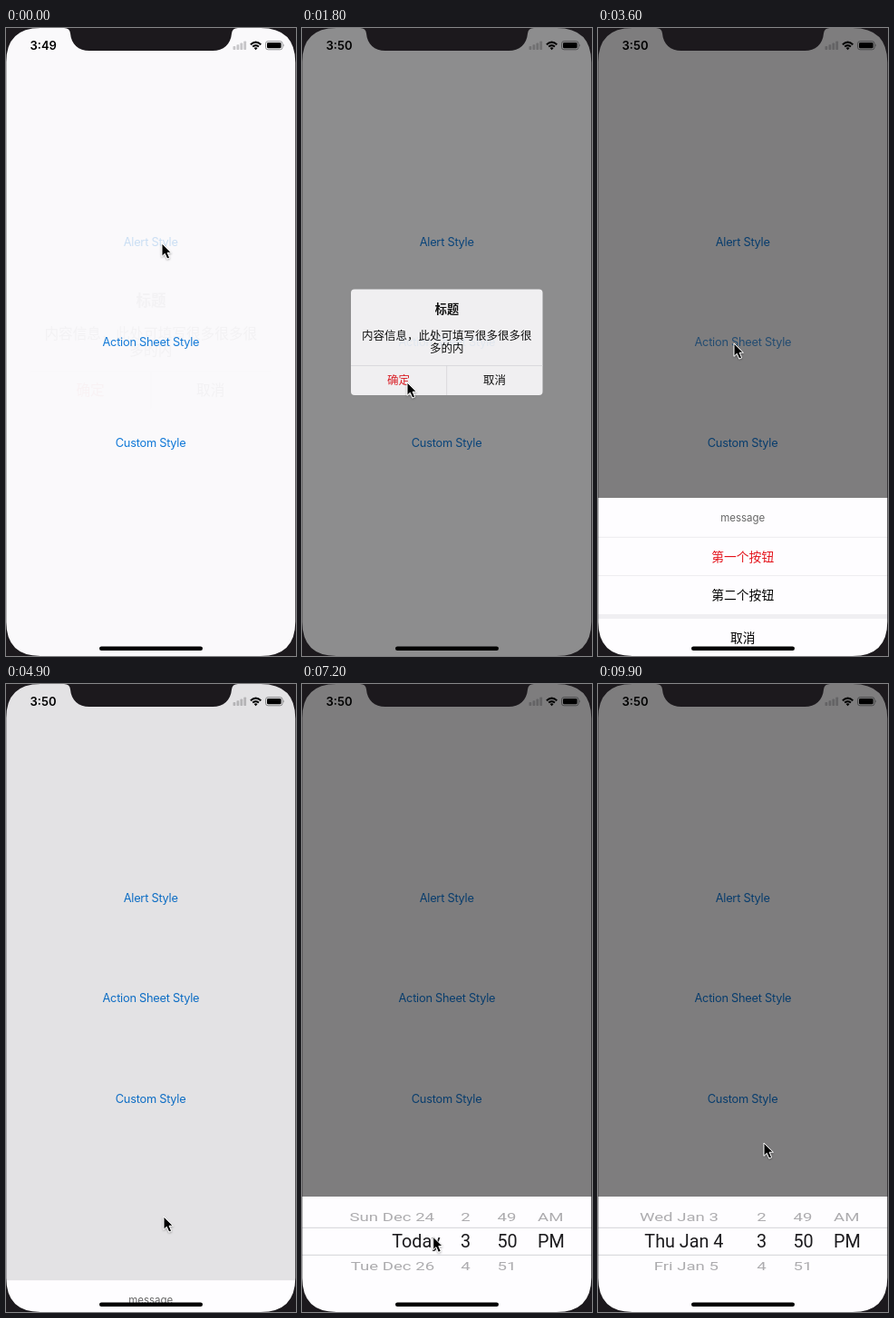
An HTML page for the animation above (10 s loop, 320 by 691 pixels).

```html
<!DOCTYPE html>
<html lang="en">
<head>
<meta charset="utf-8">
<title>Popup styles</title>
<style>
  html, body { margin: 0; width: 100%; height: 100%; overflow: hidden; background: #fdfcfe; }
  svg { display: block; width: 100vw; height: 100vh; }
  text { font-family: Inter, "Noto Sans CJK SC", "Noto Sans CJK", sans-serif; text-anchor: middle; }
  .link { font-size: 12.8px; letter-spacing: -.25px; fill: #0f79da; }
  .clock { font-size: 13px; font-weight: 600; text-anchor: start; }
  .cjk { font-family: "Noto Sans CJK SC", "Noto Sans CJK", sans-serif; }
  .body { font-size: 12.5px; }
  .title { font-size: 13.2px; font-weight: 700; }
  .row { font-size: 13.8px; }
  .note { font-size: 11.5px; fill: #666; }
  .wheel text { font-family: Roboto, sans-serif; font-size: 19.8px; }
  .red { fill: #e4141c; }
  .rule { stroke: #dddce0; stroke-width: .8; }
</style>
</head>
<body>
<svg viewBox="0 0 320 691" preserveAspectRatio="none">
  <defs>
    <clipPath id="wheelClip"><rect y="577" width="320" height="72"/></clipPath>
    <filter id="shadow" x="-50%" y="-50%" width="200%" height="200%">
      <feDropShadow dx="0" dy="1" stdDeviation="1" flood-opacity=".35"/>
    </filter>
  </defs>

  <rect width="320" height="691" fill="#fdfcfe"/>
  <text class="link" id="alertLink" x="159.7" y="239.5">Alert Style</text>
  <text class="link" id="sheetLink" x="159.9" y="350">Action Sheet Style</text>
  <text class="link" id="customLink" x="159.6" y="461">Custom Style</text>

  <text class="clock" id="clock" x="26.5" y="23.8"></text>
  <g fill="#c9c8cb">
    <rect x="250.5" y="20" width="2.8" height="4" rx=".7"/>
    <rect x="254.5" y="18.3" width="2.8" height="5.7" rx=".7"/>
    <rect x="258.4" y="16.5" width="2.8" height="7.5" rx=".7"/>
    <rect x="262.3" y="14.6" width="2.8" height="9.4" rx=".7"/>
  </g>
  <g fill="none" stroke="#000" stroke-width="2">
    <path d="M269.9 18.2Q275.6 13 281.3 18.2M272.2 20.6Q275.6 17.6 279 20.6"/>
    <path d="M273.6 22L275.6 24.2L277.6 22Q275.6 20.5 273.6 22Z" fill="#000" stroke="none"/>
  </g>
  <rect x="286.5" y="14.6" width="18.6" height="9.2" rx="2.6" fill="none" stroke="#8a898c" stroke-width=".9"/>
  <rect x="288" y="16.1" width="15.6" height="6.2" rx="1.4"/>
  <path d="M306 17.6Q307.6 19.2 306 20.8Z" fill="#8a898c"/>

  <rect id="dim" width="320" height="691"/>

  <g id="alert">
    <rect x="54" y="287.5" width="211.5" height="116.5" rx="4" fill="#fefdff"/>
    <path class="rule" d="M54 371.6H265.5M159.7 371.6V404"/>
    <text class="cjk title" x="160" y="313.8">标题</text>
    <text class="cjk body" x="159.8" y="342.5">内容信息，此处可填写很多很多很</text>
    <text class="cjk body" x="159.8" y="356.8">多的内</text>
    <text class="cjk body red" x="106.6" y="392.2">确定</text>
    <text class="cjk body" x="212.4" y="392.2">取消</text>
  </g>

  <g id="sheet">
    <rect y="517" width="320" height="174" fill="#fefdff"/>
    <rect y="645" width="320" height="5" fill="#f0eff2"/>
    <path class="rule" d="M0 560.3H320M0 602.6H320" opacity=".65"/>
    <text class="note" x="159.7" y="543">message</text>
    <text class="cjk row red" x="159.7" y="586.6">第一个按钮</text>
    <text class="cjk row" x="159.7" y="629.2">第二个按钮</text>
    <text class="cjk row" x="159.7" y="676">取消</text>
  </g>

  <g id="picker">
    <rect y="564" width="320" height="127" fill="#fefdff"/>
    <g class="wheel" id="wheel" clip-path="url(#wheelClip)"></g>
    <path d="M0 598.3H320M0 628.3H320" stroke="#d0cfd3" stroke-width=".9"/>
  </g>

  <rect x="103" y="680.4" width="114" height="4.6" rx="2.3"/>
  <g fill="#1c191d">
    <path fill-rule="evenodd" d="M0 0H320V691H0ZM38 0Q0 0 .3 38V653Q0 691 38 691H281Q319.3 691 319.3 653V38Q319.3 0 281 0Z"/>
    <path d="M64 0Q70.5 0 71 6C72 18 80 25 92 25H228C240 25 248 18 249 6Q249.5 0 256 0Z"/>
  </g>
  <path id="cursor" d="M0 0V14.3L3.3 11.3L5.8 17L8.6 15.8L6.1 10.2H10.4Z"
    stroke="#fff" stroke-width="1" stroke-linejoin="round" filter="url(#shadow)"/>
</svg>
<script>
const LOOP = 10000;
const $ = id => document.getElementById(id);
const clamp = v => Math.max(0, Math.min(1, v));
const span = (t, start, length) => clamp((t - start) / length);
const easeOut = p => 1 - (1 - p) ** 2;
const easeInOut = p => p * p * (3 - 2 * p);
const show = (el, opacity) => el.setAttribute('opacity', opacity);
const move = (el, transform) => el.setAttribute('transform', transform);

// [time, x, y]
const cursorPath = [
  [0, 172, 237], [550, 172, 237], [1600, 116, 390], [1900, 116, 390],
  [2750, 150, 347], [3800, 150, 347], [4550, 174, 586], [5000, 174, 586],
  [5950, 178, 455], [6850, 178, 455], [7300, 140, 630], [7400, 140, 630],
  [7900, 134, 545], [8300, 134, 545], [8750, 168, 625], [8850, 168, 625],
  [9350, 183, 505], [LOOP, 183, 505]
];

function cursorAt(t) {
  const i = cursorPath.findIndex(key => key[0] > t);
  const [t0, x0, y0] = cursorPath[i - 1], [t1, x1, y1] = cursorPath[i];
  const p = easeInOut(span(t, t0, t1 - t0));
  return [x0 + (x1 - x0) * p, y0 + (y1 - y0) * p];
}

const WHEEL = { y: 613, radius: 36, step: .85 };

function addItem(anchor, x, align, label = '') {
  const el = document.createElementNS('http://www.w3.org/2000/svg', 'text');
  el.setAttribute('x', x - anchor);
  el.setAttribute('y', 7);
  el.style.textAnchor = align;
  el.textContent = label;
  $('wheel').append(el);
  return { el, anchor };
}

// Places an item on the cylinder, d rows from the centre.
function placeItem({ el, anchor }, d) {
  const angle = d * WHEEL.step;
  const visible = Math.abs(angle) < 1.5;
  el.style.display = visible ? '' : 'none';
  if (!visible) return;
  const scale = 1 - .06 * Math.min(1, Math.abs(d));
  move(el, `translate(${anchor} ${WHEEL.y + WHEEL.radius * Math.sin(angle)}) scale(${scale} ${Math.cos(angle)})`);
  el.setAttribute('fill', Math.abs(d) < .5 ? '#1c1b1e' : '#adacaf');
}

const columns = [
  [180.5, 'middle', ['2', '3', '4']],
  [215.5, 'start', ['49', '50', '51']],
  [260, 'start', ['AM', 'PM']]
];
for (const [x, align, labels] of columns)
  labels.forEach((label, i) => placeItem(addItem(x, x, align, label), i - 1));

const days = Array.from({ length: 5 }, () => addItem(46, 152.5, 'end'));

function drawDays(value) {
  const middle = Math.round(value);
  days.forEach((item, i) => {
    const k = middle + i - 2;
    const date = new Date(Date.UTC(2017, 11, 25 + k));
    const [week, day, month] = date.toUTCString().replace(',', '').split(' ');
    item.el.textContent = k ? `${week} ${month} ${+day}` : 'Today';
    item.el.setAttribute('x', k && +day < 10 ? 92.5 : 106.5);
    placeItem(item, k - value);
  });
}

// Tapped links drop to 20% and fade back after release.
const linkAlpha = (t, press, release) =>
  t < press ? 1 : t < release ? .2 : .2 + .8 * span(t, release, 500);

function draw(t) {
  const alertIn = easeOut(span(t, -4, 400));
  const alert = alertIn * (1 - easeOut(span(t, 1780, 350)));
  const sheet = easeOut(span(t, 3150, 450)) * (1 - easeOut(span(t, 4680, 400)));
  const picker = easeOut(span(t, 6210, 500));

  show($('alertLink'), linkAlpha(t, 0, 0));
  show($('sheetLink'), linkAlpha(t, 3000, 3250));
  show($('customLink'), linkAlpha(t, 6080, 6200));
  $('clock').textContent = t < 1000 ? '3:49' : '3:50';

  show($('dim'), .5 * Math.max(alert, sheet, picker));
  show($('alert'), alert);
  move($('alert'), `translate(159.75 345.75) scale(${1.26 - .26 * alertIn}) translate(-159.75 -345.75)`);
  move($('sheet'), `translate(0 ${174 * (1 - sheet)})`);
  move($('picker'), `translate(0 ${127 * (1 - picker)})`);
  drawDays(8 * easeOut(span(t, 7350, 1150)) + 2 * easeOut(span(t, 8850, 850)));
  move($('cursor'), `translate(${cursorAt(t)})`);
}

const begin = performance.now();
function tick() {
  draw((performance.now() - begin) % LOOP);
  requestAnimationFrame(tick);
}
tick();
</script>
</body>
</html>
```
